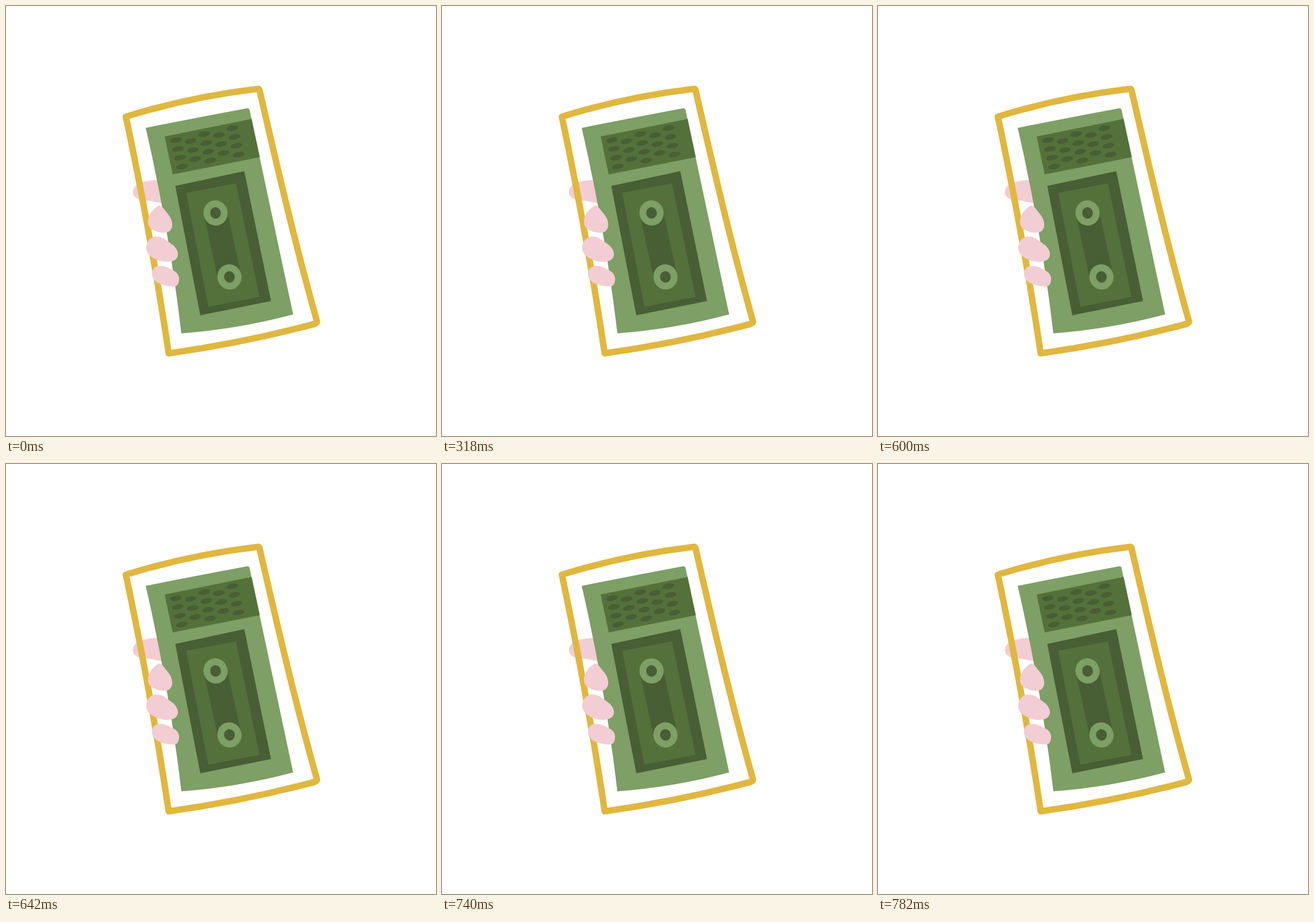
An HTML page that plays this animation: 748 px wide and 748 px high, repeating every 0.81 s.

```html
<!DOCTYPE html>
<html lang="en">
<head>
<meta charset="utf-8">
<title>Pocket tape player</title>
<style>
  html, body { margin: 0; width: 100%; height: 100%; overflow: hidden; background: #fff; }
  svg { display: block; width: 100vw; height: 100vh; }
  .light { fill: #7e9f65; }
  .mid { fill: #54713b; }
  .dark { fill: #485e35; }
  .skin { fill: #f2cdd3; }
  .band { stroke: #485e35; stroke-width: 41; }
  .case { fill: none; stroke: #e0b73f; stroke-width: 11.2; stroke-linejoin: round; }
</style>
</head>
<body>
<svg viewBox="0 0 748 748">
  <g id="player">
    <path class="skin" d="M263 303C245 303 221.500 307 221 323C220.500 336 234 338 248 338.500L271 343L285 343L280 303Z"/>
    <path class="light" d="M243 212Q333 194 419 178Q422.500 177.500 423.500 180L499.500 536.500Q404 562 305 569.500Q284 389 243 212Z"/>
    <path class="mid" d="M276 227L427.300 196.500L441.500 263L290 293Z"/>
    <g id="holes" class="dark"></g>
    <path class="dark" d="M294.500 313L414.500 287.300L461 513.300L338 538Z"/>
    <path class="mid" d="M313.500 325L400 308.500L441 506L352 523Z"/>
    <path class="band" d="M364.500 360L388.700 471.200"/>
    <g id="reels"></g>
    <path class="case" d="M208.500 192.500Q320 158 437 144.300Q440 143.800 441 146.500C464 246 499 400 540.500 547Q542 551.500 537 553Q414 586 283 604.200Q252 397 208.500 192.500Z"/>
    <g class="skin">
      <path d="M266 347C271 346 275 354 281 361C287 368 290 376 289 383C288 390 283 394.500 275 394.500C263 394 247 389 247 376C247 362 257 352 266 347Z"/>
      <path d="M262 401C274 401 280 409 288 414C296 419 300 428 299 434C297 443 288 445 278 445C262 444 244 435 244 421C244 409 252 401 262 401Z"/>
      <path d="M268 452C277 452 286 457 293 461C299 465 302 471 301 477C300 484 298 488 291 488C276 487 254 483 254 466C254 457 260 452 268 452Z"/>
    </g>
  </g>
</svg>
<script>
const LOOP = 810, HOLD = 530, STEP = 70, SWING = 7;
const CENTER = 374;
const byId = id => document.getElementById(id);

function ellipse(parent, x, y, rx, ry, turn, cls) {
  const e = document.createElementNS("http://www.w3.org/2000/svg", "ellipse");
  const attrs = { rx, ry, transform: `translate(${x} ${y}) rotate(${turn})` };
  if (cls) attrs.class = cls;
  for (const k in attrs) e.setAttribute(k, attrs[k]);
  parent.append(e);
}

// Speaker holes: three long columns with two shorter ones between them
function holes(cols, rows, x, y, dx, dy) {
  for (let c = 0; c < cols; c++)
    for (let r = 0; r < rows; r++)
      ellipse(byId("holes"), x + 49.2 * c + dx * r, y - 10.4 * c + dy * r, 10.3, 4.6, -11);
}
holes(3, 4, 295.5, 233.3, 3.5, 15.3);
holes(2, 3, 321, 235, 4, 15.6);

for (const [x, y] of [[364.5, 360], [388.7, 471.2]]) {
  ellipse(byId("reels"), x, y, 21, 22, -12, "light");
  ellipse(byId("reels"), x, y, 9.3, 10, -12, "dark");
}

// Rests, then snaps left, back, right and back
function angleAt(t) {
  if (t < HOLD) return 0;
  return [-SWING, 0, SWING, 0][Math.floor((t - HOLD) / STEP)];
}

function draw(now) {
  byId("player").setAttribute("transform", `rotate(${angleAt(now % LOOP)} ${CENTER} ${CENTER})`);
}

function tick() {
  draw(performance.now());
  requestAnimationFrame(tick);
}
tick();
</script>
</body>
</html>
```
